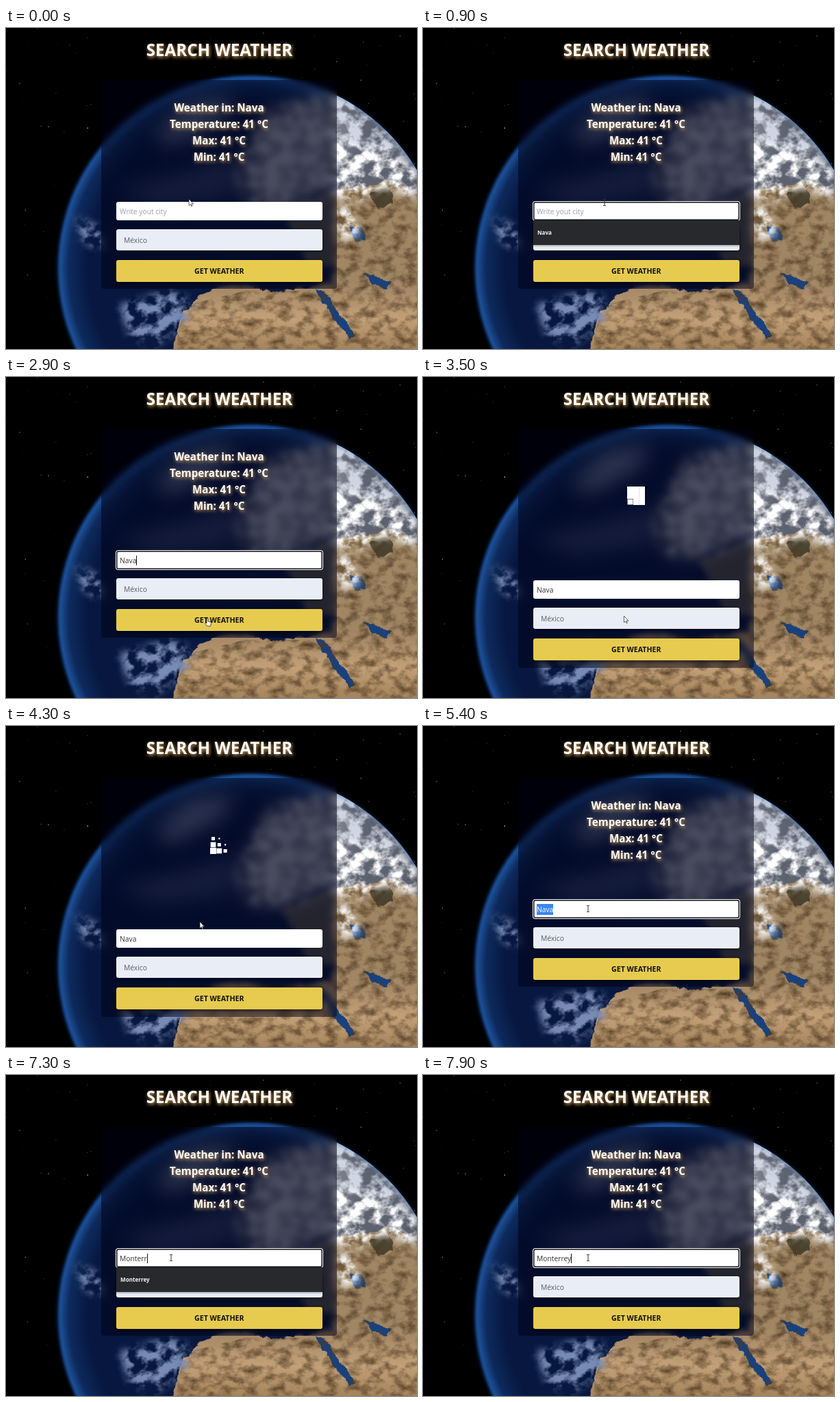
These frames come from a looping animation (600 px wide and 469 px high, 8000 ms). An HTML page:

```html
<!DOCTYPE html>
<html lang="en">
<head>
<meta charset="utf-8">
<title>Search weather</title>
<style>
html, body { margin: 0; width: 100%; height: 100%; overflow: hidden; background: #000; }
body { position: relative; font: 10.3px "Open Sans", "Noto Sans", sans-serif; }
body > *, #panel > * { position: absolute; box-sizing: border-box; white-space: pre; }
#sky { left: 0; top: 0; will-change: transform; }
h1 { left: 0; top: 16px; width: 623px; margin: 0; text-align: center; font-size: 24.2px; line-height: 32px; }
h1, #report { color: #fff; font-weight: 700; text-shadow: 1px 2px 5px #d9a760; }
#panel { left: 139px; top: 76px; width: 344px; height: 305px; border-radius: 4px; background: rgba(0, 0, 22, .5); backdrop-filter: blur(4px); }
#report { left: 0; top: 27.5px; width: 344px; text-align: center; font-size: 15.2px; line-height: 24px; }
.field { left: 21.5px; width: 301.5px; border-radius: 3px; }
#city { top: 178px; height: 27px; padding-left: 5.5px; line-height: 28px; background: #fff; color: #333; }
#city.focus { box-shadow: 0 0 0 1px #fff, inset 0 0 0 1.5px #101014; }
#city.empty { color: #9c9db0; }
#city span { display: inline-block; line-height: 16px; }
#city .picked { background: #3b86ee; color: #fff; }
#caret { display: inline-block; width: 1px; height: 14px; background: #111; vertical-align: -3px; }
#country { top: 218px; height: 31px; padding-left: 11.5px; line-height: 32px; background: #e9edf6; color: #5b5d68; box-shadow: 0 1px 5px #0008; }
#go { top: 262.5px; height: 32.5px; line-height: 33px; text-align: center; font-weight: 700; font-size: 10.6px; background: #e6cb4f; color: #111; box-shadow: 0 2px 6px #000a; }
#hint { top: 205px; height: 36px; padding-left: 6.5px; line-height: 36px; background: #27292d; color: #f2f2f2; font-weight: 700; font-size: 8.1px; border-radius: 0; box-shadow: 0 1px 3px #0006; }
#loader { left: 159px; top: 84px; }
.loading#panel { height: 349px; }
.loading > .field { margin-top: 43px; }
.loading > #report, #panel:not(.loading) > #loader { display: none; }
#pointer { left: 0; top: 0; pointer-events: none; }
</style>
</head>
<body>
<svg id="sky" width="600" height="469">
  <defs>
    <radialGradient id="ocean" cx="357" cy="351" r="282" gradientUnits="userSpaceOnUse">
      <stop offset="0" stop-color="#08193f"/><stop offset=".84" stop-color="#07173f"/>
      <stop offset=".94" stop-color="#0d2a5c"/><stop offset=".985" stop-color="#1c4f96"/>
      <stop offset="1" stop-color="#0a2450"/>
    </radialGradient>
    <linearGradient id="desert" x1="0" y1="380" x2="0" y2="469" gradientUnits="userSpaceOnUse">
      <stop offset="0" stop-color="#a58866"/><stop offset=".5" stop-color="#c3a077"/>
      <stop offset="1" stop-color="#a5845c"/>
    </linearGradient>
    <clipPath id="disc"><circle cx="357" cy="351" r="282"/></clipPath>
    <filter id="rough" x="-10%" y="-10%" width="120%" height="120%">
      <feTurbulence type="fractalNoise" baseFrequency=".06" numOctaves="4" seed="4"/>
      <feDisplacementMap in="SourceGraphic" scale="11" xChannelSelector="R" yChannelSelector="G"/>
      <feGaussianBlur stdDeviation=".6"/>
    </filter>
    <filter id="wisps" x="-10%" y="-10%" width="120%" height="120%" color-interpolation-filters="sRGB">
      <feTurbulence type="fractalNoise" baseFrequency=".05 .06" numOctaves="5" seed="9"/>
      <feColorMatrix values="0 0 0 0 1  0 0 0 0 1  0 0 0 0 1  4 0 0 0 -1.5" result="noise"/>
      <feGaussianBlur in="SourceGraphic" stdDeviation="6"/>
      <feComposite in2="noise" operator="in"/>
    </filter>
    <filter id="grain" x="0" y="0" width="100%" height="100%" color-interpolation-filters="sRGB">
      <feTurbulence type="fractalNoise" baseFrequency=".06 .08" numOctaves="5" seed="2"/>
      <feColorMatrix values="0 0 0 0 .3  0 0 0 0 .22  0 0 0 0 .13  0 1.8 0 0 -.72" result="noise"/>
      <feComposite in="noise" in2="SourceGraphic" operator="in"/>
    </filter>
    <filter id="glow"><feGaussianBlur stdDeviation="2"/></filter>
    <filter id="haze" x="-50%" y="-50%" width="200%" height="200%"><feGaussianBlur stdDeviation="14"/></filter>
  </defs>
  <g id="stars" fill="#a9a9b4"></g>
  <circle cx="357" cy="351" r="281" fill="none" stroke="#174a92" stroke-width="2" filter="url(#glow)"/>
  <g clip-path="url(#disc)">
    <circle cx="357" cy="351" r="282" fill="url(#ocean)"/>
    <g filter="url(#rough)">
      <path fill="#5d6270" d="M470 85L530 110L640 240V260H480Z"/>
      <path fill="#4a4a48" d="M400 270L485 235V350L440 345L425 310Z"/>
      <path fill="#a08664" d="M478 238L560 225L620 250V400H478Z"/>
      <path fill="url(#desert)" d="M246 480Q246 430 272 402Q300 372 350 378L400 386L470 372H620V480Z"/>
      <path fill="#4b4430" d="M530 238L562 232L566 256L540 266Z"/>
      <g fill="#144383">
        <path d="M503 290L520 292L527 311L512 314Z"/>
        <path d="M524 355L540 365L561 372L557 382L535 375Z"/>
        <path d="M452 380L464 384L488 418L512 450L504 456L476 424Z"/>
      </g>
    </g>
    <path filter="url(#grain)" d="M250 470Q245 430 275 402L350 384H476L484 240L610 220V470Z"/>
    <g filter="url(#haze)">
      <path fill="#8d8f9a" opacity=".75" d="M345 215L385 125L475 100L510 150L470 235L400 260L360 260Z"/>
      <path fill="#7d8aa8" opacity=".7" d="M215 160L265 110L330 100L320 130L245 170Z"/>
      <path fill="#33436b" opacity=".8" d="M160 235L250 215L340 190L330 245L220 260Z"/>
    </g>
    <g filter="url(#wisps)">
      <path fill="#c3c6cc" d="M335 215L380 120L480 90L540 140L500 230L410 265L350 260Z" opacity=".5"/>
      <path fill="#fff" d="M475 160L530 165L600 205V250L550 232L510 255L475 245Z"/>
      <path fill="#fff" d="M475 170L540 180L592 215L550 235L500 240L475 235Z"/>
      <path fill="#cfd6e2" d="M475 95L520 105L590 190L540 180L475 160Z"/>
      <path fill="#fff" d="M480 262L505 262L518 300L490 312Z"/>
      <path fill="#7e91b8" d="M100 275L135 290L145 325L115 315Z"/>
      <path fill="#788bb4" d="M165 405L240 383L275 400L255 440L215 465L180 450Z"/>
    </g>
    <circle cx="357" cy="351" r="281" fill="none" stroke="#6f9fd8" stroke-width="2"
      stroke-dasharray="400 1400" stroke-dashoffset="-1400" opacity=".8" filter="url(#glow)"/>
  </g>
</svg>
<h1>SEARCH WEATHER</h1>
<div id="panel">
  <div id="report">Weather in: Nava
Temperature: 41 °C
Max: 41 °C
Min: 41 °C</div>
  <svg id="loader" width="26" height="28" fill="#fff"></svg>
  <div id="city" class="field"></div>
  <div id="country" class="field">México</div>
  <div id="go" class="field">GET WEATHER</div>
  <div id="hint" class="field"></div>
</div>
<svg id="pointer" width="20" height="20" overflow="visible">
  <path id="arrow" d="M0 0V9.5L2.2 7.5L3.7 10.6L5 10L3.6 7H6.6Z" fill="#fff" stroke="#222" stroke-width=".7"/>
  <path id="beam" d="M-2 -4.5H-.5L0 -4L.5 -4.5H2M0 -4V4M-2 4.5H-.5L0 4L.5 4.5H2" fill="none" stroke="#333"/>
  <path id="hand" d="M-1 0Q0 -1 1 0V4L4.5 5Q5.5 5.3 5.4 7L4.6 11H-.4L-3.4 7.2Q-3.4 6 -2.2 6.2L-1 7Z" fill="#fff" stroke="#222" stroke-width=".8"/>
</svg>
<script>
const $ = id => document.getElementById(id);
const LOOP = 8000, LOAD = [3400, 4400];

// [time, x, y] of the pointer's hot spot
const path = [[0, 267, 250], [250, 265, 255], [1900, 265, 255], [2700, 294, 353], [3400, 294, 353],
  [4100, 283, 286], [4400, 283, 286], [4900, 241, 267], [LOOP, 241, 267]];

// Letters typed one by one; the suggestion closes once the word is complete
const typed = (word, start, step) => [...word].map((_, i) =>
  [start + i * step, word.slice(0, i + 1), 1, i < word.length - 1 ? word : '']);

// [time, text, focused, suggestion, selected]
const states = [[0, ''], [300, '', 1], [600, '', 1, 'Nava'], ...typed('Nava', 1200, 200), [3300, 'Nava'],
  [4900, 'Nava', 1], [5200, 'Nava', 1, '', 1], ...typed('Monterrey', 6000, 190)];

let seed = 7;
const rand = () => (seed = seed * 16807 % 2147483647) / 2147483647;
$('stars').innerHTML = Array.from({ length: 150 }, () =>
  `<circle cx="${rand() * 600}" cy="${rand() * 469}" r="${.3 + rand() * .6}" opacity="${.3 + rand() * .6}"/>`).join('');

const ease = u => u * u * (3 - 2 * u);

function pointerAt(t) {
  const i = path.findIndex(p => p[0] > t);
  const [a, b] = [path[i - 1], path[i]];
  const u = ease((t - a[0]) / (b[0] - a[0]));
  return [a[1] + (b[1] - a[1]) * u, a[2] + (b[2] - a[2]) * u];
}

// 3 by 3 squares that shrink and grow in diagonal waves from the lower left
function drawLoader(t) {
  let squares = '';
  for (let i = 0; i < 9; i++) {
    const col = i % 3, row = Math.floor(i / 3);
    const local = t - (col + 2 - row) * 100;
    const phase = local < 0 ? 0 : local % 1300 / 455;
    const size = 9 * (phase > 2 ? 1 : ease(Math.abs(1 - phase)));
    squares += `<rect x="${4.5 + col * 8.8 - size / 2}" y="${4.5 + row * 9 - size / 2}" width="${size}" height="${size}"/>`;
  }
  $('loader').innerHTML = squares;
}

function drawPointer(t, loading) {
  const [x, y] = pointerAt(t), shift = loading ? 43 : 0;
  const within = (top, bottom) => y >= top + shift && y <= bottom + shift;
  const kind = within(254, 281) ? 'beam' : within(338, 371) ? 'hand' : 'arrow';
  for (const id of ['arrow', 'beam', 'hand']) $(id).style.display = id === kind ? '' : 'none';
  $('pointer').style.transform = `translate(${x}px, ${y}px)`;
}

let shown;
function drawForm(t) {
  const [since, text, focus, hint, picked] = states.findLast(s => s[0] <= t);
  const caret = focus && !picked && (t - since) % 1000 < 500 && !(hint && !text);
  const label = `<span class="${picked ? 'picked' : ''}">${text || 'Write yout city'}</span>`;
  const bar = caret ? '<b id="caret"></b>' : '';
  const next = text ? label + bar : bar + label;
  if (next !== shown) $('city').innerHTML = shown = next;
  $('city').className = `field ${focus ? 'focus' : ''} ${text ? '' : 'empty'}`;
  $('hint').textContent = hint || '';
  $('hint').style.display = hint ? '' : 'none';
}

function frame(now) {
  const t = now % LOOP, loading = t >= LOAD[0] && t < LOAD[1];
  $('panel').className = loading ? 'loading' : '';
  if (loading) drawLoader(t - LOAD[0]);
  drawForm(t);
  drawPointer(t, loading);
  requestAnimationFrame(frame);
}
frame(performance.now());
</script>
</body>
</html>
```
